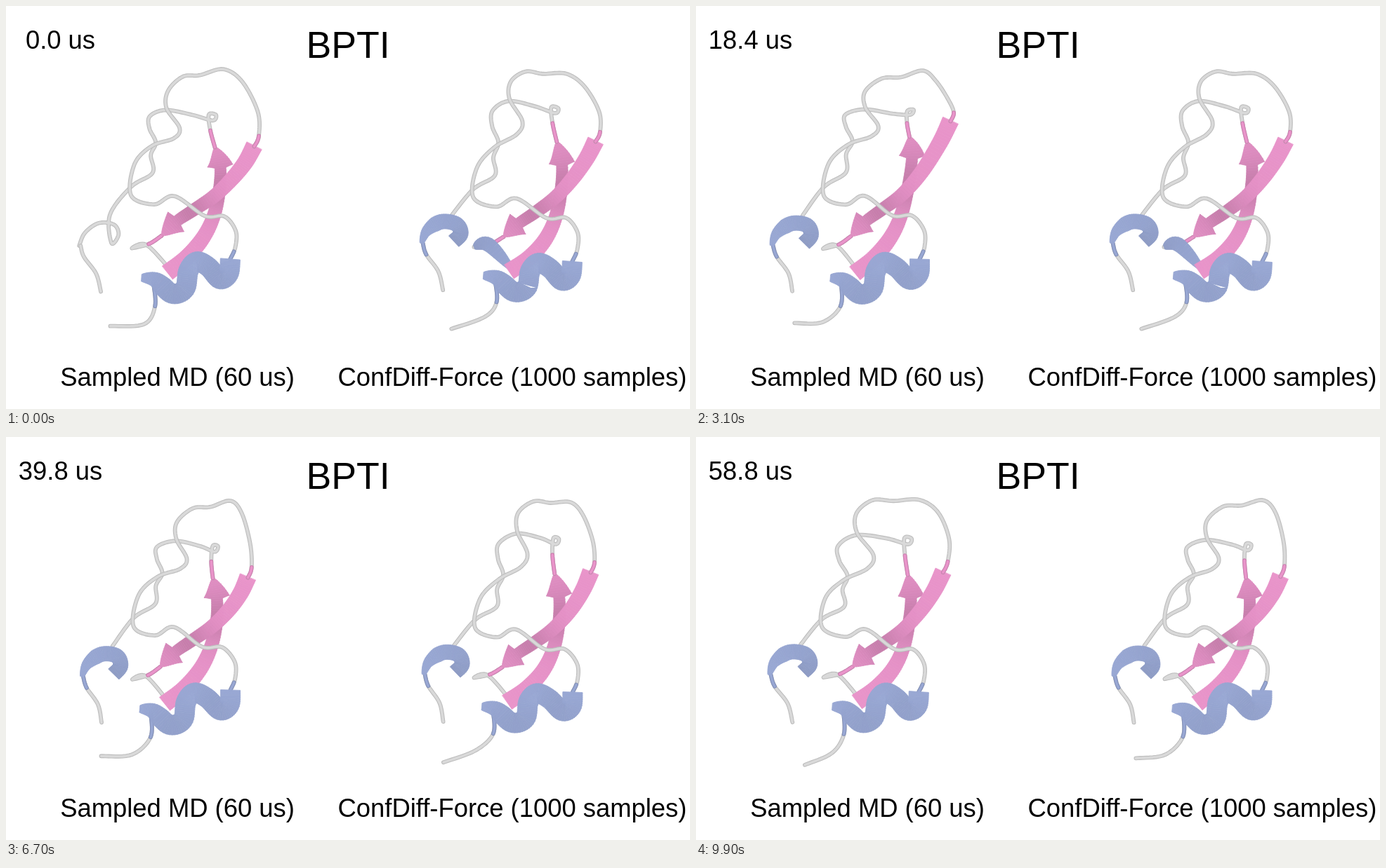
An HTML page with a canvas that plays this animation: 974 by 575 pixels, repeating every 10000 ms.

```html
<!DOCTYPE html>
<html>
<head>
<meta charset="utf-8">
<style>
html, body { margin: 0; width: 100%; height: 100%; overflow: hidden; background: #fff; }
canvas, svg { position: absolute; left: 0; top: 0; }
text { font: 36.4px "Liberation Sans", Arial, sans-serif; text-anchor: middle; }
</style>
</head>
<body>
<canvas id="stage" width="974" height="575"></canvas>
<svg width="974" height="575">
  <text id="clock" x="77.5" y="61">0.0 us</text>
  <text x="487" y="74" style="font-size:53.6px">BPTI</text>
  <text x="244" y="542">Sampled MD (60 us)</text>
  <text x="721" y="542">ConfDiff-Force (1000 samples)</text>
</svg>
<script>
// Key points of the resting fold; every step bends them with a random smooth field
const fold = {
  strand1: '349,196 337,220 318,247 294,272 264,294 241,310 221,329',
  strand2: '228,380 255,360 279,332 294,300 302,262 303,225 297,196',
  helix: '192,386 212,390 234,409 253,403 258,378 270,366 287,374 304,391 317,384 319,363',
  cap: '106,340 114,322 134,309 156,312 162,326 152,337',
  up: '349,197 355,183 354,152 338,113 316,95 284,99 258,98 236,114 235,138 253,168 244,185 212,200 186,228 180,272 212,285 240,273 281,301 309,301 326,322 326,346 319,363',
  mid: '297,197 293,172 293,150 302,151 297,158 272,149 234,141 209,152 209,172 218,194 210,214 211,240 180,260 150,298',
  nTail: '108,340 113,356 130,380 136,406',
  cTail: '208,392 209,425 188,447 144,457',
  turn: '221,329 203,340 180,345 200,341 232,376'
};
for (const k in fold) fold[k] = fold[k].split(' ').map(p => p.split(',').map(Number));

const PINK = [233, 148, 202], BLUE = [152, 167, 211], GRAY = [217, 217, 217];
const ctx = stage.getContext('2d');
ctx.lineCap = ctx.lineJoin = 'round';

const rand = n => { const v = Math.sin(n * 127.1) * 43758.5453; return v - Math.floor(v); };
const clamp = v => Math.max(0, Math.min(1, v));
const bell = (v, center, width) => Math.exp(-(((v - center) / width) ** 2));
const tint = (color, k) => `rgb(${color.map(c => c * k)})`;

// Upper loops and the tail end sway most; lift raises the top of strand 1
function bender(seed, spread, lift) {
  const a = rand(seed) * 6.28, b = rand(seed + .37) * 6.28;
  return ([x, y]) => {
    const amp = spread * (2 + 6 * clamp((250 - y) / 120) + 9 * clamp((y - 420) / 35));
    const pull = lift * bell(Math.hypot(x - 350, y - 195), 0, 55);
    return [
      x + amp * Math.sin(x / 45 + y / 70 + a) + 25 * pull,
      y + amp * Math.sin(x / 60 - y / 50 + b) - 52 * pull
    ];
  };
}

// Catmull-Rom curve as a dense list of points
function curve(pts, n = 10) {
  const at = i => pts[Math.max(0, Math.min(pts.length - 1, i))];
  const out = [];
  for (let j = 0; j <= (pts.length - 1) * n; j++) {
    const i = Math.floor(j / n), t = j / n - i;
    out.push([0, 1].map(d => {
      const [p, q, r, s] = [-1, 0, 1, 2].map(o => at(i + o)[d]);
      return q + t / 2 * (r - p + t * (2 * p - 5 * q + 4 * r - s + t * (3 * (q - r) + s - p)));
    }));
  }
  return out;
}

function trace(pts) {
  ctx.beginPath();
  pts.forEach(p => ctx.lineTo(...p));
}

function tube(pts, color) {
  trace(pts);
  for (const [width, k] of [[5.8, .87], [3.6, 1]]) {
    ctx.lineWidth = width;
    ctx.strokeStyle = tint(color, k);
    ctx.stroke();
  }
}

// Gray coil whose first and last key segments may take the colour of a neighbour
function coil(pts, head, tail) {
  const line = curve(pts);
  tube(line, GRAY);
  if (head) tube(line.slice(0, 11), head);
  if (tail) tube(line.slice(-8), tail);
}

// Band of varying width and brightness along a curve
function ribbon(pts, color, width, light) {
  const line = curve(pts), last = line.length - 1;
  const sides = line.map((p, i) => {
    const a = line[Math.max(0, i - 1)], b = line[Math.min(last, i + 1)];
    const h = width(i / last) / 2 / (Math.hypot(b[0] - a[0], b[1] - a[1]) || 1);
    const nx = (a[1] - b[1]) * h, ny = (b[0] - a[0]) * h;
    return [[p[0] + nx, p[1] + ny], [p[0] - nx, p[1] - ny]];
  });
  ctx.lineWidth = .8;
  for (let i = 0; i < last; i++) {
    trace([sides[i][0], sides[i + 1][0], sides[i + 1][1], sides[i][1]]);
    ctx.closePath();
    ctx.fillStyle = ctx.strokeStyle = tint(color, light(i / last));
    ctx.fill();
    ctx.stroke();
  }
}

function strand(pts) {
  ribbon(pts, PINK,
    u => u < 5 / 6 ? 24 - 10 * u : 36 * 6 * (1 - u),
    u => 1 - .12 * bell(u, .68, .16) - .04 * u);
}

function drawFold(bend, capped, knotted) {
  const f = {};
  for (const k in fold) f[k] = fold[k].map(bend);
  coil(f.turn, PINK);
  coil(f.cTail, BLUE);
  if (knotted) ribbon(f.turn.slice(2), BLUE, u => 6 + 14 * Math.sin(Math.PI * u), u => .94 + .06 * u);
  strand(f.strand2);
  strand(f.strand1);
  coil(capped ? f.mid : [...f.mid, ...f.cap.reverse()], PINK);
  coil(f.nTail, capped && BLUE);
  if (capped) ribbon(f.cap, BLUE, u => Math.min(21, 5 + 50 * u), u => 1 - .08 * u * u);
  coil(f.up, PINK, BLUE);
  ribbon(f.helix, BLUE, u => 28 * Math.min(1, .35 + 4 * u), u => .98 + .02 * Math.cos(u * 12.6));
}

function drawPanel(x, ...state) {
  ctx.save();
  ctx.translate(x, 0);
  drawFold(...state);
  ctx.restore();
}

let shown = -1;
function tick(now) {
  const step = Math.floor(now / 100) % 100;
  if (step !== shown) {
    shown = step;
    ctx.clearRect(0, 0, 974, 575);
    drawPanel(0, bender(step + 5, 1, bell(step, 38, 12)), step % 12 > 0, false);
    // The generated samples repeat after 31 steps
    drawPanel(487, bender(step % 31 + 911, .8, 0), true, step % 31 === 0);
    clock.textContent = (step * .594).toFixed(1) + ' us';
  }
  requestAnimationFrame(tick);
}
tick(0);
</script>
</body>
</html>
```
